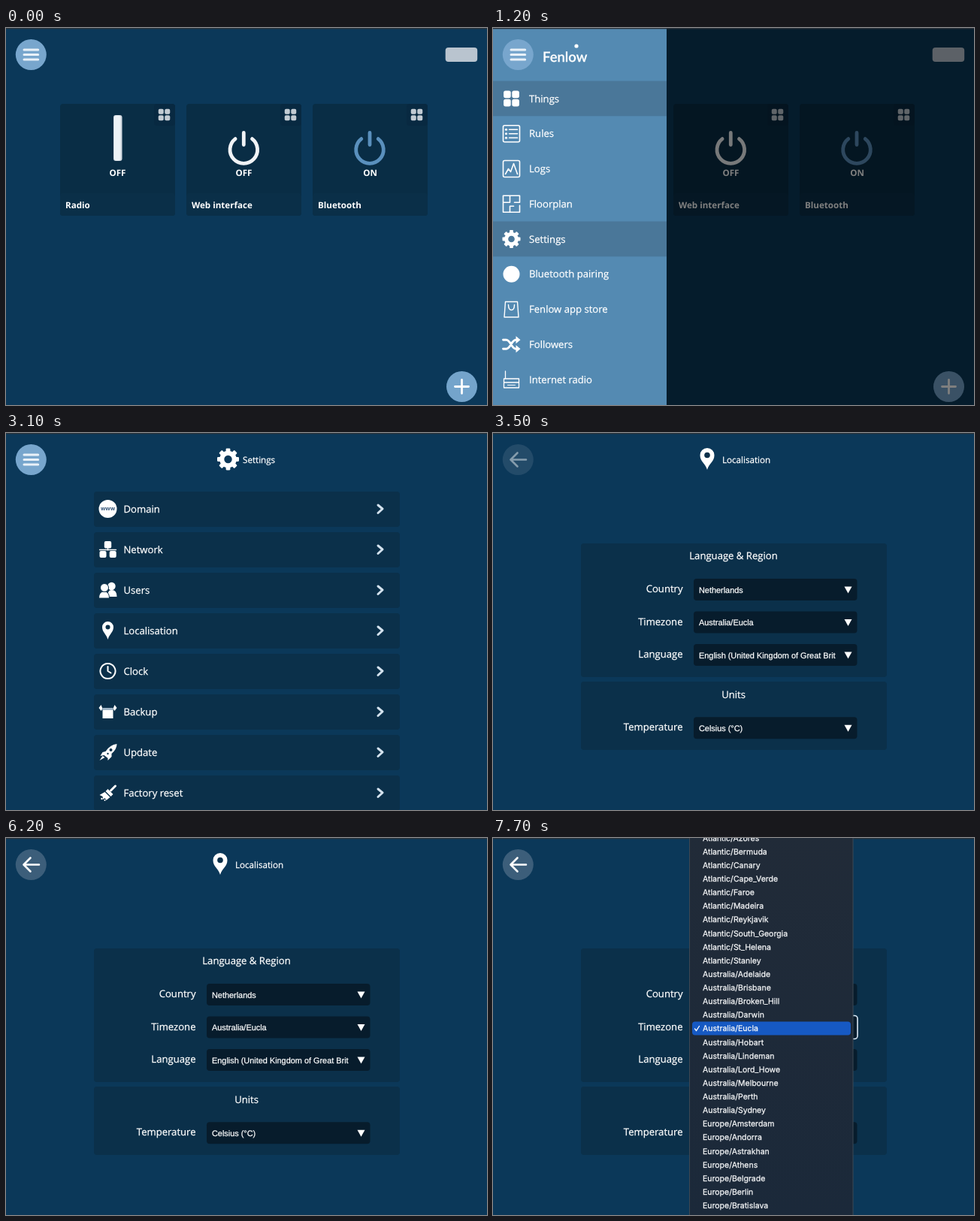
An HTML page that plays this animation: 640x502 px, repeating every 8000 ms.

```html
<!DOCTYPE html>
<html lang="en">
<head>
<meta charset="utf-8">
<title>Smart home panel</title>
<style>
html, body { margin: 0; width: 100%; height: 100%; overflow: hidden; background: #0b3859; }
svg { display: block; width: 640px; height: 502px; font: 13.1px "Open Sans", "Noto Sans", sans-serif; }
text { fill: #fff; stroke: #fff; stroke-width: .25px; text-rendering: geometricPrecision; }
.bold { font-weight: 700; font-size: 11.6px; stroke: none; }
.title { font-size: 11.65px; }
.value { font: 10.9px "Liberation Sans", Arial, sans-serif; }
.zone { font: 10.5px Inter, sans-serif; fill: #f4f6f8; }
.brand { font: 600 18.5px Lato, sans-serif; }
.www { font-size: 7.5px; font-weight: 700; fill: #35577a; stroke: none; }
.line { fill: none; stroke-linecap: round; stroke-linejoin: round; }
.panel { fill: #0b304a; }
</style>
</head>
<body>
<svg id="stage" viewBox="0 0 640 502"></svg>
<script>
const LOOP = 8000;

const rect = (x, y, w, h, fill, r = 0) =>
  `<rect x="${x}" y="${y}" width="${w}" height="${h}" rx="${r}" fill="${fill}"/>`;
const circle = (x, y, r, fill) => `<circle cx="${x}" cy="${y}" r="${r}" fill="${fill}"/>`;
const text = (x, y, str, cls = '', extra = '') =>
  `<text x="${x}" y="${y}" class="${cls}" ${extra}>${str}</text>`;
const solid = (d, fill = '#fff') => `<path d="${d}" fill="${fill}"/>`;
const line = (d, width = 1.6, color = '#fff') =>
  `<path class="line" d="${d}" stroke="${color}" stroke-width="${width}"/>`;
const group = (id, body) => `<g id="${id}">${body}</g>`;
const at = (x, y, body) => `<g transform="translate(${x} ${y})">${body}</g>`;
const MIDDLE = 'text-anchor="middle"', END = 'text-anchor="end"';

// Icons are drawn around their own centre.
function grid(size, gap, color) {
  const a = -size - gap / 2, b = gap / 2;
  return [[a, a], [b, a], [a, b], [b, b]]
    .map(([x, y]) => rect(x, y, size, size, color, size * .27)).join('');
}

function gear(r) {
  let s = `<circle r="${r * .57}" fill="none" stroke="#fff" stroke-width="${r * .42}"/>`;
  for (let i = 0; i < 8; i++) {
    s += `<rect x="${-r * .2}" y="${-r}" width="${r * .4}" height="${r * .36}" rx="${r * .08}"
      fill="#fff" transform="rotate(${i * 45})"/>`;
  }
  return s;
}

const pin = (w, h) => {
  const r = w / 2, c = r - h / 2;
  return solid(`M0 ${h / 2}C${-r * .25} ${h * .2} ${-r} ${c + r * .9} ${-r} ${c}
    A${r} ${r} 0 0 1 ${r} ${c}C${r} ${c + r * .9} ${r * .25} ${h * .2} 0 ${h / 2}Z`) +
    circle(0, c, r * .4, '#0b304a');
};

const power = color => line('M11.2-14.4A18.3 18.3 0 1 1-11.2-14.4M0-22.5V-6.5', 4.8, color);
const frame = 'M-9-11H9Q11-11 11-9V9Q11 11 9 11H-9Q-11 11-11 9V-9Q-11-11-9-11Z';

const menuIcons = [
  grid(9.6, 1.6, '#fff'),
  line(frame + 'M-3-5.5H8M-3 0H8M-3 5.5H8') + [-5.5, 0, 5.5].map(y => circle(-7, y, 1.6, '#fff')).join(''),
  line(frame + 'M-8 7L-4 0L-1 4L3-7L8 7'),
  line('M11-2V-11H-11V11H11V2M-2-11V-2H-11M-2 3V11M-2 3H3M4-2H11'),
  gear(12),
  circle(0, 0, 11, '#fff'),
  line('M-8-10H8L9.5 10.5H-9.5ZM-4-6Q-4 1 0 1Q4 1 4-6', 1.4),
  line('M-11-6H-7C-1-6 0 6 6 6H8M-11 6H-7C-1 6 0-6 6-6H8', 2.8) +
    solid('M6-11L12-6L6-1ZM6 1L12 6L6 11Z'),
  line('M-10-1H10V11H-10ZM-10 4H10M-8-1V-11', 1.3) + line('M-5 7.5H5', 1)
];

const rowIcons = [
  circle(0, 0, 12, '#fff') + text(0, 2, 'www', 'www', MIDDLE),
  rect(-4.7, -11, 9.4, 9.5, '#fff', 2) + rect(-11, 2, 9, 9, '#fff', 2) + rect(2.2, 2, 9, 9, '#fff', 2) +
    line('M-11 .5H11M0-2V1', 1.3),
  circle(5, -5, 5.2, '#fff') + solid('M0 9C0 3 1 0 5 0Q12 0 12 9Z') +
    `<g stroke="#0b304a">${solid('M-12 11Q-12 2-5 2Q2 2 2 11Z') + circle(-4.5, -3, 5.5, '#fff')}</g>`,
  pin(15, 24),
  line('M0-10A10 10 0 1 1-.01-10M0-6V0L4 2.5', 2),
  solid('M-7-3H7V9H-7Z') + solid('M-7-5H7V-2H-7Z', '#9fb4c6') +
    solid('M-7-4L-9-9L-12-5L-9-1ZM7-4L9-9L12-5L9-1Z'),
  solid('M12-11Q3-10-3-1L-7 0L-10 5L-5 4L0 8L0 11L5 6L5 2Q12-4 12-11ZM-7 5L-11 11L-4 7Z') +
    circle(4, -3, 2, '#0b304a') + circle(0, 2, 1.2, '#0b304a'),
  line('M10-9L4-3', 3) + solid('M0-5L7 2L4 5L-3-2ZM-4-1L3 6L-2 10L-4 7L-6 9L-7 5L-11 3Z') +
    circle(-8, 8, 1.2, '#fff') + circle(-4, 10, 1, '#fff')
];

function card(x, name, state, icon) {
  return rect(x, 101, 153, 149, '#092d45', 4) + rect(x, 220, 153, 30, '#0a2f48', 4) +
    rect(x + 125, 101, 28, 29, '#082941', 4) + at(x + 138.5, 115.5, grid(7, 1.5, '#c2cbd3')) + icon +
    text(x + 76.5, 197, state, 'bold', MIDDLE) + text(x + 7, 240, name, 'bold');
}

const home =
  rect(584.7, 26, 42.5, 19, '#b9c4cf', 4) +
  card(72, 'Radio', 'OFF', rect(143, 116, 11.5, 61, '#cfd7df', 3) + rect(144, 116.5, 8.5, 60, '#eef2f6', 3)) +
  card(240, 'Web interface', 'OFF', at(316.3, 162, power('#f0f3f6'))) +
  card(408, 'Bluetooth', 'ON', at(484, 162, power('#5a90bd'))) +
  circle(606.5, 477.5, 20.5, '#74a4cb') + line('M597.5 477.5H615.5M606.5 468.5V486.5', 2.8);

const rowNames = ['Domain', 'Network', 'Users', 'Localisation', 'Clock', 'Backup', 'Update', 'Factory reset'];
const rowY = i => 101 + 54 * i;
const rowIcon = (icon, i) => at(135.5, rowY(i), icon);
const settings =
  at(295.5, 35, gear(14.5)) + text(315, 39.7, 'Settings', 'title') +
  rowNames.map((name, i) => `<rect class="panel" x="117" y="${rowY(i) - 23}" width="407" height="47" rx="4"/>` +
    text(156.5, rowY(i) + 4.7, name) +
    line(`M495 ${rowY(i) - 5}L501 ${rowY(i)}L495 ${rowY(i) + 5.5}`, 3, '#d4e2ee')).join('') +
  rowIcons.slice(0, 6).map(rowIcon).join('') +
  group('late', rowIcons.slice(6).map((icon, i) => rowIcon(icon, i + 6)).join(''));

const field = (y, label, value) =>
  text(252.5, y + 3.5, label, '', END) + rect(267, y - 14.5, 217.5, 29, '#071c2c', 4) +
  text(274, y + 4, value, 'value') + solid(`M467.5 ${y - 4}H477.5L472.5 ${y + 5}Z`);

const local =
  at(285, 34.5, pin(19, 29)) + text(305, 39.7, 'Localisation', 'title') +
  '<rect class="panel" x="117" y="147" width="407" height="178" rx="4"/>' +
  '<rect class="panel" x="117" y="331" width="407" height="91" rx="4"/>' +
  text(320, 168, 'Language &amp; Region', '', MIDDLE) + text(320, 352.7, 'Units', '', MIDDLE) +
  field(208.5, 'Country', 'Netherlands') + field(252, 'Timezone', 'Australia/Eucla') +
  field(295.5, 'Language', 'English (United Kingdom of Great Brit') +
  field(392.7, 'Temperature', 'Celsius (°C)');

const back = circle(33.3, 35.5, 20.5, '#3c5e7a') + line('M44 35.5H24M32.5 26.5L23.5 35.5L32.5 44.5', 2.6);

const zones = Object.entries({
  Atlantic: 'Azores Bermuda Canary Cape_Verde Faroe Madeira Reykjavik South_Georgia St_Helena Stanley',
  Australia: 'Adelaide Brisbane Broken_Hill Darwin Eucla Hobart Lindeman Lord_Howe Melbourne Perth Sydney',
  Europe: 'Amsterdam Andorra Astrakhan Athens Belgrade Berlin Bratislava'
}).flatMap(([area, list]) => list.split(' ').map(city => `${area}/${city}`));

const popup =
  '<linearGradient id="glass" x2="0" y2="1"><stop stop-color="#212b38"/><stop offset="1" stop-color="#1b293a"/></linearGradient>' +
  '<rect x="267" y="236.5" width="218" height="31" rx="4" fill="none" stroke="#dbe7f2" stroke-width="1.6"/>' +
  '<rect x="261.5" y="-5" width="217.5" height="512" fill="url(#glass)" stroke="#3d4854"/>' +
  rect(265, 244.4, 211, 18.2, '#1659c3', 4) + line('M268.5 254L270.5 256.7L274.5 250.5', 1.3) +
  zones.map((zone, i) => text(279, (3.7 + 18.12 * i).toFixed(1), zone, 'zone')).join('');

const menuNames = ['Things', 'Rules', 'Logs', 'Floorplan', 'Settings', 'Bluetooth pairing',
  'Fenlow app store', 'Followers', 'Internet radio'];
const menuY = i => 94 + 46.75 * i;
const mark = (id, i) => group(id, rect(0, menuY(i) - 23.5, 231, 46.8, '#4a7799'));
const menu = rect(0, 0, 231, 502, '#548ab2') + mark('markThings', 0) + mark('markSettings', 4) +
  text(66, 45, 'Fenlow', 'brand') + circle(111, 24, 2.6, '#fff') +
  menuNames.map((name, i) => at(24.5, menuY(i), menuIcons[i]) + text(48, menuY(i) + 4.5, name)).join('');

const burger = circle(33.3, 35.5, 20.5, '#78a6cd') + line('M24 29H42.7M24 35.5H42.7M24 42H42.7', 3, '#e9f1f8');

const status = rect(0, 497, 103, 8, '#1d232a', 2) + text(4, 507, 'localhost/settings', 'value');

document.getElementById('stage').innerHTML =
  rect(0, 0, 640, 502, '#0b3859') + group('home', home) + group('settings', settings) +
  group('local', local) + group('back', back) + group('dim', rect(0, 0, 640, 502, '#000')) +
  group('menu', menu) + group('burger', burger) + rect(0, 0, 640, 1.3, '#2b333b') +
  group('status', status) + group('popup', popup);

// Steps are [ms, value]; a repeated time makes a hard change.
function play(id, steps, prop = 'opacity') {
  const full = [[0, steps[0][1]], ...steps, [LOOP, steps.at(-1)[1]]];
  const frames = full.map(([ms, value]) => ({ offset: ms / LOOP, [prop]: value }));
  document.getElementById(id).animate(frames, { duration: LOOP, iterations: Infinity }).startTime = 0;
}
const show = (id, from, to = LOOP) =>
  play(id, [[from, from ? 0 : 1], [from, 1], [to, 1], [to, to < LOOP ? 0 : 1]]);
const slide = x => `translateX(${x}px)`;

show('home', 0, 1500);
show('settings', 1500, 3400);
show('late', 2000);
show('local', 3400);
show('popup', 6800);
show('markThings', 0, 1500);
show('markSettings', 1100);
show('status', 1700, 2400);
play('back', [[3400, 0], [3600, 1]]);
play('burger', [[1500, 1], [1500, 0], [2000, 0], [2100, 1], [3400, 1], [3400, 0]]);
play('dim', [[500, 0], [1100, .5], [1500, .5], [2080, 0]]);
play('menu', [[500, slide(-231)], [1100, slide(0)], [1500, slide(0)], [2080, slide(-231)]], 'transform');
</script>
</body>
</html>
```
